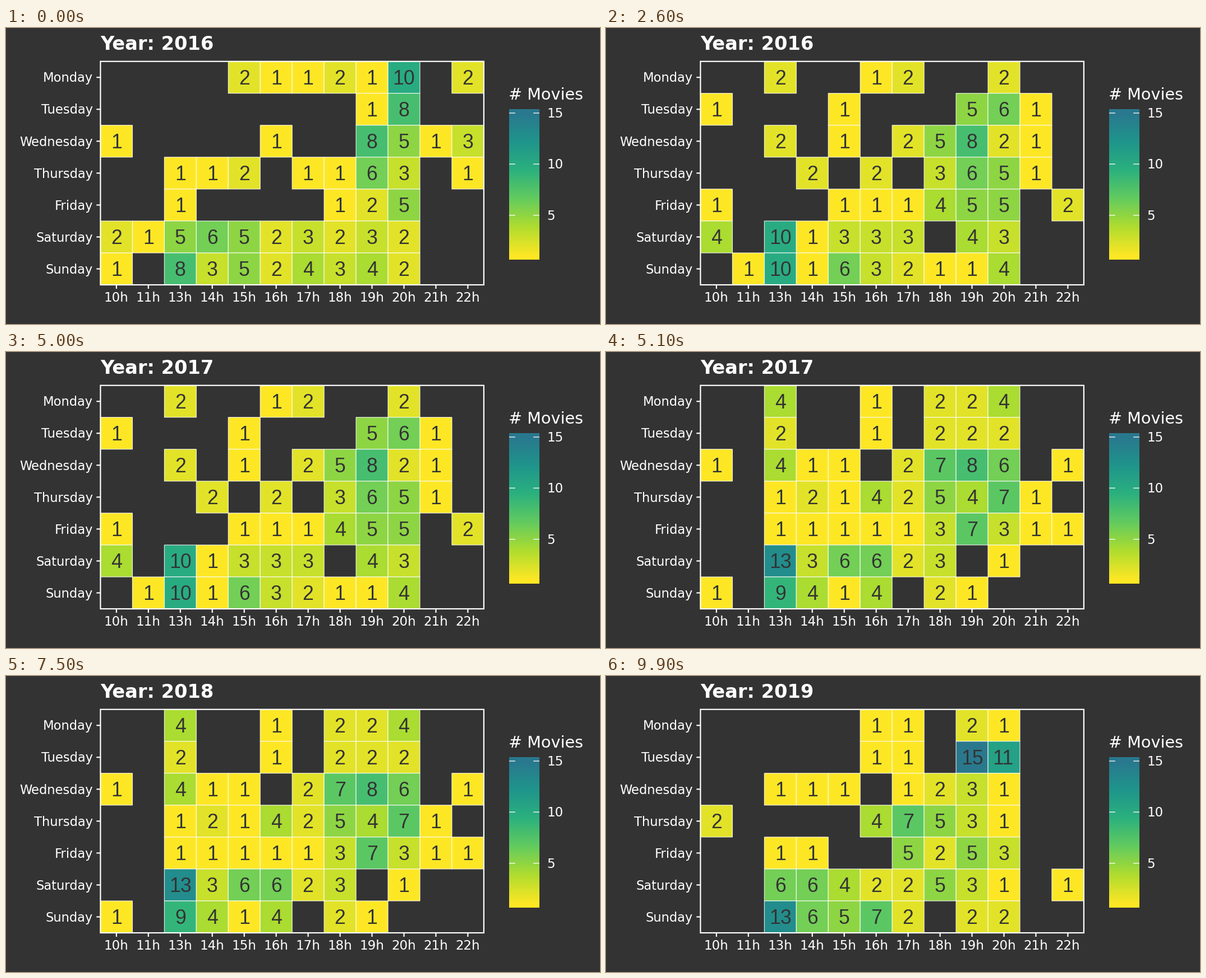
Recreate the animation shown at these times as a matplotlib script. Size 1059 px wide and 529 px high, loop 10000 ms.

```python
import matplotlib.pyplot as plt
import numpy as np
from matplotlib.animation import FuncAnimation
from matplotlib.colors import LinearSegmentedColormap
from matplotlib.patches import Rectangle
from matplotlib.textpath import TextPath

W, H, DPI = 1059, 529, 64
PT = 72 / DPI  # points per pixel
DARK = "#333333"
LEFT, TOP, RIGHT, BOTTOM = 168.4, 59.7, 851.9, 459
DAYS = ["Monday", "Tuesday", "Wednesday", "Thursday", "Friday", "Saturday", "Sunday"]
HOURS = [10, 11, 13, 14, 15, 16, 17, 18, 19, 20, 21, 22]
FRAMES, HOLD, FIRST_YEAR = 100, 25, 2016
DIGIT_PX, DIGIT_ADVANCE = 35.6, 0.556

# One row per day, one column per hour
COUNTS_2016 = """
. . . . 2 1 1 2 1 10 . 2
. . . . . . . . 1 8 . .
1 . . . . 1 . . 8 5 1 3
. . 1 1 2 . 1 1 6 3 . 1
. . 1 . . . . 1 2 5 . .
2 1 5 6 5 2 3 2 3 2 . .
1 . 8 3 5 2 4 3 4 2 . .
"""
COUNTS_2017 = """
. . 2 . . 1 2 . . 2 . .
1 . . . 1 . . . 5 6 1 .
. . 2 . 1 . 2 5 8 2 1 .
. . . 2 . 2 . 3 6 5 1 .
1 . . . 1 1 1 4 5 5 . 2
4 . 10 1 3 3 3 . 4 3 . .
. 1 10 1 6 3 2 1 1 4 . .
"""
COUNTS_2018 = """
. . 4 . . 1 . 2 2 4 . .
. . 2 . . 1 . 2 2 2 . .
1 . 4 1 1 . 2 7 8 6 . 1
. . 1 2 1 4 2 5 4 7 1 .
. . 1 1 1 1 1 3 7 3 1 1
. . 13 3 6 6 2 3 . 1 . .
1 . 9 4 1 4 . 2 1 . . .
"""
COUNTS_2019 = """
. . . . . 1 1 . 2 1 . .
. . . . . 1 1 . 15 11 . .
. . 1 1 1 . 1 2 3 1 . .
2 . . . . 4 7 5 3 1 . .
. . 1 1 . . 5 2 5 3 . .
. . 6 6 4 2 2 5 3 1 . 1
. . 13 6 5 7 2 . 2 2 . .
"""
YEARS = [c.split() for c in (COUNTS_2016, COUNTS_2017, COUNTS_2018, COUNTS_2019)]

viridis = plt.get_cmap("viridis")
cmap = LinearSegmentedColormap.from_list("movies", viridis(np.linspace(1, 0.4, 6)))

fig = plt.figure(figsize=(W / DPI, H / DPI), dpi=DPI, facecolor=DARK)
ax = fig.add_axes([0, 0, 1, 1])
ax.axis("off")


def label(x, y, text, px, color="white", font="DejaVu Sans", **kw):
    """Text whose pen starts at x on the baseline y."""
    return ax.text(x, y, text, fontsize=px * PT, ha="left", va="baseline",
                   color=color, family=font, **kw)


def ink(text, px):
    box = TextPath((0, 0), text, size=px, prop={"family": "DejaVu Sans"}).get_extents()
    return box.x0, box.x1


def line(x0, y0, x1, y1, width):
    ax.plot([x0, x1], [y0, y1], color="white", lw=width * PT,
            solid_capstyle="butt", zorder=4, snap=False)


cell_w = (RIGHT - LEFT) / len(HOURS)
cell_h = (BOTTOM - TOP) / len(DAYS)
col_x = LEFT + cell_w * (np.arange(len(HOURS)) + 0.5)
row_y = TOP + cell_h * (np.arange(len(DAYS)) + 0.5)

# Tiles with their numbers
cells = []
for y in row_y:
    for x in col_x:
        tile = Rectangle((x - cell_w / 2, y - cell_h / 2), cell_w, cell_h,
                         ec="white", lw=PT, zorder=1, snap=False)
        ax.add_patch(tile)
        number = label(x, y + 12.8, "", DIGIT_PX, DARK, "Liberation Sans", zorder=2)
        cells.append((x, tile, number))

# Panel frame and axes
ax.add_patch(Rectangle((LEFT, TOP), RIGHT - LEFT, BOTTOM - TOP,
                       fill=False, ec="white", lw=2.2 * PT, zorder=3, snap=False))
for y, day in zip(row_y, DAYS):
    line(161.3, y, LEFT, y, 2.2)
    label(154.6 - ink(day, 22.6)[1], y + 8.2, day, 22.6)
for x, hour in zip(col_x, HOURS):
    line(x, BOTTOM, x, 466, 2.2)
    label(x - sum(ink(f"{hour}h", 22.9)) / 2, 489, f"{hour}h", 22.9)

# Colour bar
BAR_X0, BAR_X1, BAR_Y0, BAR_Y1 = 897, 951, 145, 414
ax.imshow(np.linspace(1, 0, 20)[:, None], cmap=cmap, vmin=0, vmax=1, aspect="auto",
          interpolation="bilinear", extent=(BAR_X0, BAR_X1, BAR_Y1, BAR_Y0))
ax.set(xlim=(0, W), ylim=(H, 0))
label(896.5, 128.5, "# Movies", 28.6)
for value, y in ((15, 152), (10, 243.2), (5, 334.6)):
    line(BAR_X0, y, BAR_X0 + 10.8, y, 1.3)
    line(BAR_X1 - 10.8, y, BAR_X1, y, 1.3)
    label(964, y + 8.2, str(value), 22.9)

title = label(168, 39, "", 33.6, weight="bold")


def state(frame):
    return min(max(frame - 1, 0) // HOLD, len(YEARS) - 1)


def update(frame):
    for (x, tile, number), count in zip(cells, YEARS[state(frame)]):
        shown = count != "."
        tile.set_visible(shown)
        number.set_visible(shown)
        if shown:
            tile.set_facecolor(cmap((int(count) - 1) / 14))
            number.set_text(count)
            number.set_x(x - len(count) * DIGIT_ADVANCE * DIGIT_PX / 2)
    # The heading follows the tiles one step later
    title.set_text(f"Year: {FIRST_YEAR + state(frame - 1)}")
    return []


anim = FuncAnimation(fig, update, frames=FRAMES, interval=100,
                     init_func=lambda: update(0), repeat=True, repeat_delay=0)
plt.show()
```
